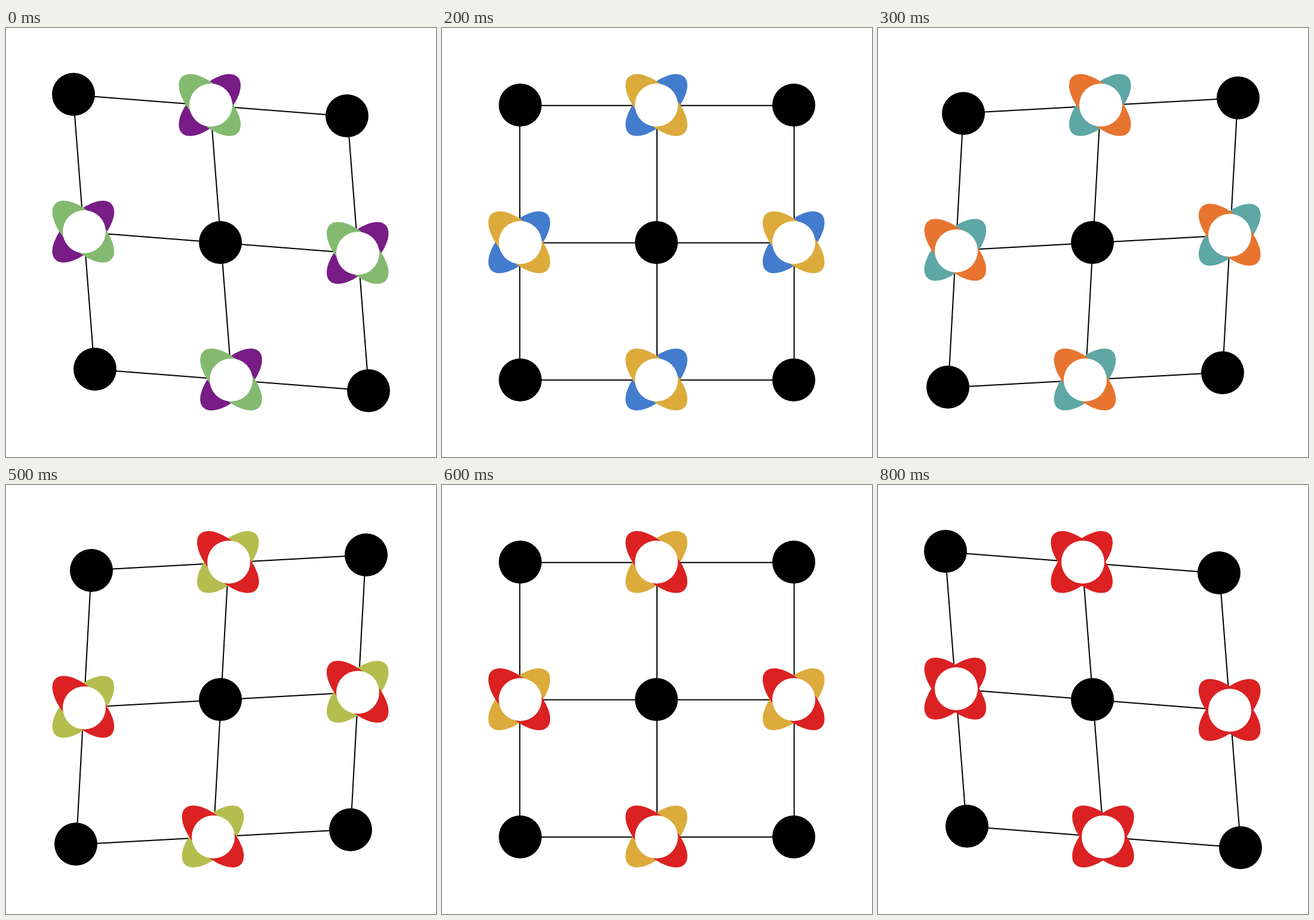
Write an HTML page with a canvas that moves like this. It is 720x718 px and loops after 900 ms.

```html
<!DOCTYPE html>
<html lang="en">
<head>
<meta charset="utf-8">
<title>Swaying lattice</title>
<style>
  html, body { margin: 0; width: 100%; height: 100%; overflow: hidden; background: #fff; }
  canvas { display: block; }
</style>
</head>
<body>
<canvas id="stage" width="720" height="718"></canvas>
<script>
const ctx = document.getElementById('stage').getContext('2d');

const STEP_MS = 100;
const RAINBOW = ['#781c86', '#3f4ebb', '#447ccd', '#5ea7a5', '#83ba70',
                 '#b5bd4e', '#dcab3c', '#e77530', '#db2122'];
const LAST = RAINBOW.length - 1;
const CENTER = { x: 359.95, y: 359.5 };
const SPACING = 229.7;
const SWAY = 17.9;
const DISC_RADIUS = 36;
const PETAL = { long: 66.2, short: 31.3, shift: -0.9 };
const INDICES = [-1, 0, 1];

// Discs sit on odd pixel positions; lines and petals do not.
const snap = v => 2 * Math.floor(v / 2) + 1;

function node(col, row, shear) {
  return {
    x: CENTER.x + SPACING * col + shear * row,
    y: CENTER.y + SPACING * row + shear * col
  };
}

function line(a, b) {
  ctx.beginPath();
  ctx.moveTo(a.x, a.y);
  ctx.lineTo(b.x, b.y);
  ctx.stroke();
}

function ellipse(x, y, rx, ry, angle, color) {
  ctx.fillStyle = color;
  ctx.beginPath();
  ctx.ellipse(x, y, rx, ry, angle, 0, 2 * Math.PI);
  ctx.fill();
}

function disc(p, color) {
  ellipse(snap(p.x), snap(p.y), DISC_RADIUS, DISC_RADIUS, 0, color);
}

function petals(p, angle, color) {
  ellipse(p.x + PETAL.shift, p.y + PETAL.shift, PETAL.long, PETAL.short, angle, color);
}

function draw(time) {
  const step = Math.floor(time / STEP_MS) % RAINBOW.length;
  const shear = SWAY * Math.cos(2 * Math.PI * step / LAST);
  const rising = RAINBOW[step];
  const falling = RAINBOW[Math.min(LAST, step + LAST / 2)];

  ctx.fillStyle = '#fff';
  ctx.fillRect(0, 0, 720, 718);

  ctx.strokeStyle = '#000';
  ctx.lineWidth = 2;
  for (const i of INDICES) {
    line(node(-1, i, shear), node(1, i, shear));
    line(node(i, -1, shear), node(i, 1, shear));
  }

  for (const row of INDICES) {
    for (const col of INDICES) {
      const p = node(col, row, shear);
      const isFlower = (row + col) % 2 !== 0;
      if (isFlower) {
        petals(p, -Math.PI / 4, rising);
        petals(p, Math.PI / 4, falling);
      }
      disc(p, isFlower ? '#fff' : '#000');
    }
  }
}

const start = performance.now();
function tick() {
  draw(performance.now() - start);
  requestAnimationFrame(tick);
}
tick();
</script>
</body>
</html>
```
